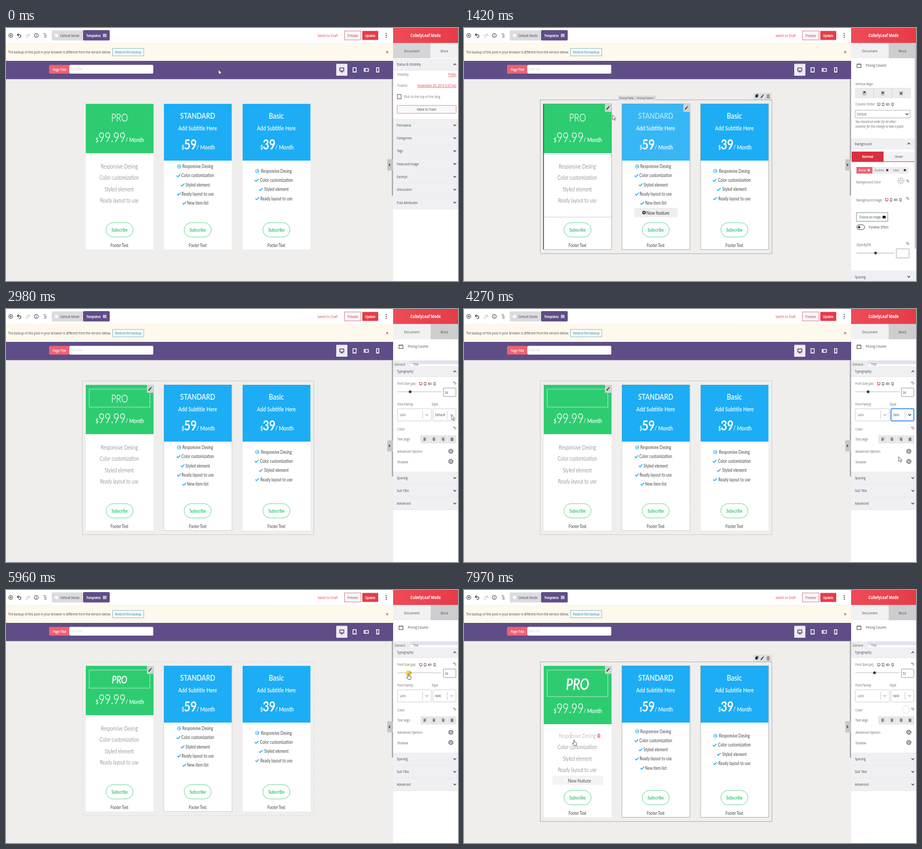
Write an HTML page that moves like this. It is 850 px wide and 477 px high and loops after 8000 ms.

```html
<!DOCTYPE html>
<html lang="en">
<head>
<meta charset="utf-8">
<title>Pricing table editor</title>
<style>
html, body { margin: 0; width: 100%; height: 100%; overflow: hidden; background: #efeeec; }
svg { display: block; width: 100%; height: 100%; font-family: "Open Sans", "Noto Sans", sans-serif; }
.l { font-family: Lato, sans-serif; }
</style>
</head>
<body>
<svg id="stage" viewBox="0 0 850 477"></svg>
<script>
const LOOP = 8000, INK = '#454952', RED = '#e63c48', BLUE = '#1cadf5', GREEN = '#2ecc71', PURPLE = '#5f4d87', PALE = '#f0f0f3';

// Drawing helpers; all lettering shares one narrow set.
const text = (x, y, size, str, o = '') => `<text transform="translate(${x} ${y}) scale(.79 1)" font-size="${size}" ${o.includes('fill=') ? '' : `fill="${INK}"`} ${o}>${str}</text>`;
const mid = (x, y, size, str, o = '') => text(x, y, size, str, 'text-anchor="middle" ' + o);
const lato = (x, y, size, str, o = '') => mid(x, y, size, str, 'class="l" ' + o);
const rect = (x, y, w, h, fill, o = '') => `<rect x="${x}" y="${y}" width="${w}" height="${h}" fill="${fill}" ${o}/>`;
const line = (d, color = INK, w = 1, o = '') => `<path d="${d}" fill="none" stroke="${color}" stroke-width="${w}" ${o}/>`;
const dot = (x, y, r, fill, o = '') => `<circle cx="${x}" cy="${y}" r="${r}" fill="${fill}" ${o}/>`;
const at = (x, y, s, body) => `<g transform="translate(${x} ${y}) scale(${s})">${body}</g>`;
const group = (id, body) => `<g id="${id}">${body}</g>`;
const border = (c, w = 1) => `stroke="${c}" stroke-width="${w}"`;
const dash = (x, y, w, h, id) => rect(x, y, w, h, 'none', `id="${id}" ${border('#777', .8)} stroke-dasharray="2 1"`);

const chevron = (x, y, up, c = '#333') => line(`M${x - 2.5} ${y + (up ? 1.3 : -1.3)}l2.5 ${up ? -2.6 : 2.6}l2.5 ${up ? 2.6 : -2.6}`, c, 1.2);
const undo = (x, y, s, c = '#555') => at(x, y, s, line('M-3 -1H1A2.4 2.4 0 0 1 1 3.6H-1M-1 -3.4L-3.5 -1L-1 1.4', c, 1.1));
const pencil = (x, y) => line(`M${x - 2.3} ${y + 2.6}l4 -4.6`, '#333', 1.8) + line(`M${x - 3} ${y + 3.4}l1 -1M${x + 2} ${y - 2.4}l.8 -.9`, '#333', 1.2);
const trash = (x, y, c) => line(`M${x - 2.5} ${y - 2.2}h5M${x - 1} ${y - 3.2}h2M${x - 2} ${y - 1.5}v5h4v-5M${x} ${y - 1}v4`, c, .9);
const check = (x, y) => line(`M${x - 3} ${y}l2.2 2.2l4.4 -4.6`, BLUE, 1.6);
const gear = (x, y) => dot(x, y, 3.3, 'none', border('#444', .9)) + dot(x, y, 1.4, 'none', border('#444', .8)) +
  dot(x, y, 4.1, 'none', border('#444', 1.2) + ' stroke-dasharray="1.6 1.62"');

function device(x, y, kind, s, c) {
  const b = border(c, 1.4);
  return at(x, y, s, [
    rect(-4.2, -4, 8.4, 6.2, 'none', b) + line('M0 2V4.5M-2.5 4.5H2.5', c, 1.2),
    rect(-3, -4.2, 6, 8.4, 'none', b) + line('M-1 3H1', c, 1.2),
    rect(-4, -2.6, 8, 5.2, 'none', b) + line('M-2.2 -2V2', c, 1.4),
    rect(-2.2, -4.2, 4.4, 8.4, 'none', b) + line('M-1 3H1', c, 1.2)
  ][kind]);
}
const devices = (xs, y) => xs.map((x, i) => device(x, y, i, .58, i ? '#555' : '#c33')).join('');
const section = (y, h, label, up, cx = 844) => rect(728, y, 122, h, PALE) + line(`M728 ${y + h}H850`, '#e2e2e6', .8) +
  text(735, y + h / 2 + 2.6, 7.2, label, 'font-weight="500"') + chevron(cx, y + h / 2, up);
const aligns = (x, y, n) => line([-2.4, -.8, .8, 2.4].map((d, i) => {
  const w = i % 2 && n < 3 ? 3 : 5, start = [-2.5, -w / 2, 2.5 - w, -2.5][n];
  return `M${x + start} ${y + d}h${w}`;
}).join(''), '#333', .9);

function topBar() {
  return rect(0, 0, 728, 28.5, '#fff') +
    dot(9, 14, 3.8, 'none', border('#444')) + line('M7 14h4M9 12v4', '#444') +
    undo(25, 14, 1.1, '#444') + at(41, 14, 1.1, '<g transform="scale(-1 1)">' + undo(0, 0, 1, '#ccc') + '</g>') +
    dot(57, 14, 3.8, 'none', border('#444')) + line('M57 13.4v2.8M57 11.6v1', '#444') +
    line('M70.5 11h4.5M72 14h4.5M72 17h4.5', '#444', 1.1) +
    rect(86, 4.5, 62, 19, '#dcdcdf', 'rx="2"') + dot(95, 14, 3, '#fff') + text(102, 16.8, 7.2, 'Default Mode') +
    rect(145, 4, 50, 19.5, PURPLE, 'rx="2"') + text(151, 16.7, 6.7, 'Templates', 'fill="#fff" font-weight="700"') +
    [0, 1, 2].map(i => [0, 1, 2].map(j => rect(182.5 + i * 2.2, 11 + j * 2.2, 1.7, 1.7, '#fff')).join('')).join('') +
    text(586, 16.8, 7, 'Switch to Draft', `fill="${RED}"`) +
    rect(636.5, 5.5, 31, 17, '#f6f5f8', border('#d98790')) + mid(652, 16.8, 6.8, 'Preview', 'fill="#c03a4e"') +
    rect(670, 5.5, 30, 17, RED, 'rx="1"') + mid(685, 16.7, 6.7, 'Update', 'fill="#fff" font-weight="700"') +
    [10.5, 14, 17.5].map(y => dot(715, y, 1, '#333')).join('') +
    rect(0, 28.5, 728, 33.5, '#fef8ed') +
    text(4, 48.2, 7, 'The backup of this post in your browser is different from the version below.') +
    rect(200.5, 38.5, 58.5, 14, '#f7fafa', border('#8fc0cb')) + text(205, 48, 7, 'Restore the backup', 'fill="#23869c"') +
    line('M715 43.5l3.5 4M718.5 43.5l-3.5 4', '#444', 1) +
    rect(0, 62, 728, 34.4, PURPLE) +
    rect(119, 69.5, 158, 16.5, '#fff', 'rx="2"') + rect(81, 69.5, 38, 16.5, '#ee6173', 'rx="2"') +
    text(88, 80.5, 6.9, 'Page Title', 'fill="#fff" font-weight="600"') + text(123, 79.5, 6.6, 'Add title', 'fill="#d5d5da"') +
    rect(621, 67.5, 21, 22.5, '#eeeaf5', 'rx="1"') + [631.5, 655.5, 677.5, 699].map((x, i) => device(x, 79, i, i ? 1 : .9, i ? '#fff' : '#3d3457')).join('');
}

function card(n, x, fill, title, price, names, starts, y) {
  const c = x + 63.5, pro = n === 1;
  const white = 'fill="#fff" ';
  const rows = names.map((s, i) => pro
    ? lato(c - .5, y + i * 21.6 + 4, 10.9, s, `fill="#555" font-weight="300" ${i ? '' : 'id="first"'}`)
    : (i ? check(starts[i] - 6, y + i * 17.3) :
        dot(starts[0] - 6.5, y, 3.3, 'none', border(BLUE)) + line(`M${starts[0] - 8.5} ${y}h4m-1.7 -1.6l1.7 1.6l-1.7 1.6`, BLUE, .9)) +
      lato(c, y + i * 17.3 + 3, 8.9, s, 'fill="#444"')).join('');
  const head = pro
    ? group('fee', text(168.5, 215, 12, '$', white + 'class="l" font-weight="600"') +
        text(174, 215, 25.3, '99.99', white + `class="l" font-weight="300" ${border('#fff', .3)}`) +
        text(225, 215, 11.9, '/ Month', white + 'class="l" font-weight="600"'))
    : lato(c, 171, 15.6, title, white + `font-weight="600" id="title${n}"`) +
      lato(c, 192.7, 11.7, 'Add Subtitle Here', white + 'font-weight="600"') +
      text(c - 30.5, 229, 11.9, '$', white + 'class="l" font-weight="600"') +
      text(c - 25.8, 229, 26.5, price, white + 'class="l" font-weight="700"') +
      text(c - 2, 229, 11.9, '/ Month', white + 'class="l" font-weight="600"');
  return rect(x, 143, 127.5, 274.5, '#fff', `id="body${n}"`) +
    rect(x, 143, 127.5, pro ? 93 : 107, fill, `id="head${n}"`) + head + group('list' + n, rows) +
    group('foot' + n, rect(c - 25.5, 367, 51, 27, '#fff', `rx="13.5" ${border('#63d694')}`) +
      lato(c, 384, 9, 'Subscribe', `fill="${GREEN}" font-weight="700"`) + lato(c, 413.3, 8.6, 'Footer Text', 'fill="#444"'));
}

function canvas() {
  const items = ['Responsive Desing', 'Color customization', 'Styled element', 'Ready layout to use', 'New item list'];
  return card(1, 150, GREEN, '', '', items.slice(0, 4), [], 260.5) +
    card(2, 297, BLUE, 'STANDARD', '59', items, [332, 330, 338, 331, 341], 261) +
    card(3, 445, BLUE, 'Basic', '39', items.slice(0, 4), [479, 477, 485, 478], 269.6) +
    lato(213.5, 0, 20, 'PRO', `fill="#fff" id="pro" ${border('#fff', .3)}`) +
    rect(156.5, 151, 114, 34, 'none', `id="box" ${border('#b5e8ca')}`) +
    group('add1', rect(166.5, 336, 95, 17.5, '#eee', 'id="addBg"') + dot(190.5, 345, 2.7, '#fafafa') + lato(217, 348.5, 10.1, 'New feature', 'fill="#555"')) +
    group('add2', rect(320, 339, 82, 17.5, '#eee') + dot(338.5, 348, 3.2, '#222') + line('M336.7 348h3.6M338.5 346.2v3.6', '#fff', .9) + lato(364.5, 351.5, 10.1, 'New feature', 'fill="#333"')) +
    dash(143.5, 135.5, 435.5, 290, 'frame') + dash(149.5, 143, 128, 274.5, 'edge1') + dash(297, 143, 128, 274.5, 'edge2') + dash(445, 143, 128, 274.5, 'edge3') +
    group('pick', line('M149.5 143V417.5', '#333', 1.3)) +
    group('rules', line('M150 238.5H277M150 356.5H277', '#d0cce4', 1)) +
    group('tools', rect(544, 122, 35, 13, '#dedfe0') + rect(548, 126, 4, 5, '#222') + line('M549.5 125h3.5v4.5', '#222', 1) + pencil(561, 128.5) + trash(572, 128.5, '#555')) +
    group('pen1', rect(265, 143, 12.5, 15, '#cfd3d2') + pencil(271, 150.5)) +
    group('pen2', rect(412.5, 143, 12.5, 15, '#cfd3d2') + pencil(418.5, 150.5)) +
    group('crumb', rect(290, 127.5, 71.5, 8.5, '#dcdcdd') + text(292, 134, 5.7, 'Pricing Table → Pricing Column')) +
    group('caret', line('M0 0V22', '#fff', .8)) +
    group('bin', trash(253.5, 274.5, RED) + line('M201.5 268v13', '#aaa', .7)) +
    rect(725.5, 97, 2.5, 219, '#aaaaac') +
    rect(717, 247.5, 11, 21, '#c6c6c9') + line('M720 256l2 2l-2 2', '#222', 1.1);
}

function docPanel() {
  return section(58, 21.5, 'Status &amp; Visibility', true) +
    text(736, 90.3, 7, 'Visibility', 'fill="#777"') + text(847, 90.3, 7, 'Public', `text-anchor="end" text-decoration="underline" fill="${RED}"`) +
    text(736, 110.6, 7, 'Publish', 'fill="#777"') + text(847, 110.6, 7.1, 'November 29, 2019 9:37 pm', `text-anchor="end" text-decoration="underline" fill="${RED}"`) +
    rect(736, 125.5, 7, 8, '#fff', border('#555')) + text(748, 132.2, 7.1, 'Stick to the top of the blog', 'fill="#777"') +
    rect(735.5, 146, 111, 15, '#f9f8f9', `rx="1" ${border('#dd8b94')}`) + mid(791, 156.3, 7, 'Move to Trash') +
    ['Permalink', 'Categories', 'Tags', 'Featured Image', 'Excerpt', 'Discussion', 'Post Attributes']
      .map((s, i) => section(171 + i * 24.3, 24.3, s)).join('');
}

function columnPanel() {
  const grey = 'fill="#666"';
  const mini = (x, w, s, on) => rect(x, 262, w, 12.5, on ? '#ee6173' : '#ececee') + text(x + 4, 270.4, 5.6, s, on ? 'fill="#fff" font-weight="600"' : grey) +
    rect(x + w - 9, 266, 4, 4, on ? '#fff' : '#444');
  return text(736, 107.8, 7, 'Vertical Align', grey) + rect(736, 113.5, 104, 18, '#ececee', border('#ddd', .8)) + line('M770.5 114v17M805 114v17', '#d6d6d8') +
    [753, 787.5, 822].map((x, i) => line(`M${x - 3} ${126}h6M${x - 2.5} 119v6M${x + 2.5} 119v6`, '#777', .9) + rect(x - 1.2, 119 + i, 2.4, 4, '#333')).join('') +
    text(736, 146.3, 7, 'Column Order', grey) + devices([780, 788, 797, 806], 144) +
    rect(736, 155, 103, 14.5, '#fff', border('#aaa', .9)) + text(739, 165, 6.8, 'Default', grey) + chevron(833, 162.3) +
    text(736, 178.5, 6.7, 'You should set order for all other', grey + ' font-style="italic"') + text(736, 188.3, 6.7, 'columns for this change to take a place', grey + ' font-style="italic"') +
    section(208, 20, 'Background', true, 836.5) +
    rect(729, 233, 60, 19, '#d9303f') + mid(759, 245, 7, 'Normal', 'fill="#fff" font-weight="700"') + rect(789, 233, 58, 19, '#f3f3f5') + mid(818, 245, 7, 'Hover') +
    line('M729 252H847', '#d9303f', 1) +
    mini(738, 30, 'Classic', true) + mini(768, 35, 'Gradient') + mini(803, 33, 'Video') +
    text(738, 293.4, 7, 'Background Color', grey) + dot(821.5, 288, 5.5, '#eee', `${border('#bbb', 1.5)} stroke-dasharray="2 2"`) + line('M821.5 281v14M814.5 288h14', '#bbb', .8, 'stroke-dasharray="2 1"') + undo(834.5, 288, .75) +
    text(738, 326.5, 7, 'Background Image', grey) + devices([795, 803, 812, 821], 324) + undo(834.5, 321, .75) +
    rect(738, 348, 59, 16.5, '#fff', border('#7d9298')) + text(743, 358.8, 6.4, 'Choose an image') + rect(787, 354, 6, 5, '#222') +
    rect(738.5, 371, 15, 9, '#fff', `rx="4.5" ${border('#444')}`) + dot(743, 375.5, 2.3, '#333') + text(761, 378.2, 7.2, 'Parallax Effect') +
    text(738, 411, 7, 'Opacity(%)', grey) + undo(834.5, 406, .75) + line('M738 424.3H809', '#bbb', 1.2) + dot(774, 424.3, 2.5, '#333') +
    rect(813, 416.5, 24, 17, '#fff', border('#aaa')) + section(457, 24, 'Spacing', false, 836.5) + rect(847.5, 33, 2.5, 383, '#c3c3c6');
}

function typePanel() {
  const grey = 'fill="#666"';
  const select = (x, w) => rect(x, 188, w, 23, '#fff', `rx="1.5" ${border('#ccc')}`);
  return rect(728, 97, 32, 11, '#ececee') + rect(760, 97, 90, 7, '#e4dff1') + text(731, 107.3, 6.5, 'Element', grey) + text(765.5, 107.3, 6.5, 'Title', grey) +
    section(108, 19.5, 'Typography', true) +
    text(736, 143, 7, 'Font Size (px)', grey) + devices([780, 788, 797, 806], 141) + undo(844, 139, .75) +
    line('M736 156H819', '#bbb', 1.2) + dot(760, 156, 2.6, '#333', 'id="knob"') + rect(822.5, 149, 23.5, 16, '#fff', `rx="1" ${border('#999')}`) + text(825, 160, 7, '34', 'id="size"') +
    text(736, 182, 7, 'Font Family', grey) + text(800.5, 182, 7, 'Style', grey) +
    select(736, 64) + text(740.5, 202.3, 7, 'Lato', grey) + line('M783.5 192v15', '#ccc') + chevron(791.5, 199.5, false, '#aaa') +
    select(803, 43) + text(807, 202.3, 7, 'Default', 'id="style"') + line('M829.5 192v15', '#ccc') + chevron(838, 199.5, false, '#aaa') +
    group('focus', rect(803, 188, 43, 23, 'none', `rx="2" ${border('#2684ff', 1.6)}`) + chevron(838, 199.5)) +
    text(736, 228.7, 7, 'Color', grey) + undo(844, 224, .75) + dot(831, 225.5, 7, '#fff', `id="swatch" ${border('#ddd')}`) +
    text(736, 248, 7, 'Text align', grey) + [0, 1, 2, 3].map(i => rect(779.5 + i * 17, 238, 16.4, 15.5, '#e6e6e9') + aligns(787.7 + i * 17, 245.7, i)).join('') +
    text(736, 271, 7, 'Advanced Options', grey) + gear(836.5, 268.3) + text(736, 290.5, 7, 'Shadow', grey) + gear(836.5, 287.5) +
    section(306.5, 24, 'Spacing') + section(330.5, 24, 'Sub Title') + section(354.5, 24, 'Advanced') +
    group('menu', rect(803, 214, 43.5, 112, '#fff', `rx="2" ${border('#ccc')}`) + rect(803.5, 0, 42.5, 27, '#deebff', 'id="hot"') +
      ['Default', 'normal', 'italic', 'oblique'].map((s, i) => text(808, 230.5 + i * 27.5, 7, s)).join(''));
}

const stage = document.getElementById('stage');
stage.innerHTML = '<linearGradient id="blush"><stop stop-color="#ee4c58"/><stop offset="1" stop-color="#e63b47"/></linearGradient>' +
  rect(0, 0, 850, 477, '#efeeec') + topBar() + canvas() + rect(728, 0, 122, 477, '#fff') + rect(728, 0, 122, 28.5, 'url(#blush)') +
  mid(789, 16.9, 8.4, 'CubelyLeaf Mode', 'fill="#fff" font-weight="700"') +
  rect(728, 28.5, 70.5, 28.5, '#f1f1f3', 'id="tab1"') + rect(798.5, 28.5, 51.5, 28.5, '#f1f1f3', 'id="tab2"') +
  mid(763, 45.5, 7.6, 'Document', 'fill="#555"') + mid(824.5, 45.5, 7.4, 'Block', 'fill="#555"') +
  group('docPanel', docPanel()) +
  group('blockTop', rect(739, 68.5, 7.5, 6, 'none', border('#444')) + line('M740.8 68v-1.7M744.6 68v-1.7', '#444', 1) + text(755.5, 72.6, 7, 'Pricing Column')) +
  group('columnPanel', columnPanel()) + group('waitPanel', section(354.5, 24, 'Advanced')) + group('typePanel', typePanel()) +
  dot(0, 0, 5.5, '#fbcf2f', 'id="glow" fill-opacity=".85"') +
  group('arrow', `<path d="M0 0V9L2.1 7.1L3.6 10.2L4.9 9.6L3.5 6.6H6.3Z" fill="#fff" ${border('#333', .7)}/>`) +
  group('hand', `<path d="M-1 1Q0 -.6 1 1V4.2L4 5.1Q5.2 5.6 4.8 7.2L4 10.5H-.8L-3.6 6.8Q-3.2 5.4 -1 7Z" fill="#fff" ${border('#333', .8)} stroke-linejoin="round"/>`);

const el = {};
stage.querySelectorAll('[id]').forEach(n => el[n.id] = n);
const set = (id, name, value) => el[id].setAttribute(name, value);
const show = (id, on) => set(id, 'opacity', Number(on));
const move = (id, x, y) => set(id, 'transform', `translate(${x} ${y})`);
const clamp = v => Math.max(0, Math.min(1, v));
const smooth = v => (v = clamp(v)) * v * (3 - 2 * v);
const within = (t, a, b = Infinity) => t >= a && t < b;
const fade = (t, a, b = Infinity) => clamp((t - a) / 100) * clamp((b - t) / 100);

// Pointer stops: time, x, y
const route = [[90, 399.5, 78.5], [430, 214.5, 172], [910, 214.5, 172], [1180, 765, 195], [1420, 279.5, 164], [1690, 216, 172],
  [2330, 216, 172], [2950, 838, 200], [3300, 838, 200], [3820, 817.5, 278.5], [4620, 817.5, 278.5], [5080, 300, 235], [5400, 330, 240],
  [5880, 757, 158], [6390, 757, 158], [7080, 770, 158], [7230, 770, 158], [7620, 207, 282.5]];

function pointer(t) {
  const i = route.findIndex(k => k[0] > t);
  if (i === 0) return route[0].slice(1);
  if (i < 0) return route[route.length - 1].slice(1);
  const [a, b] = [route[i - 1], route[i]], k = smooth((t - a[0]) / (b[0] - a[0]));
  return [a[1] + (b[1] - a[1]) * k, a[2] + (b[2] - a[2]) * k];
}

function render(t) {
  const grow = smooth((t - 6400) / 660), size = Math.round(34 + 18 * grow), p = (size - 34) / 18;
  const early = within(t, 380, 2500), active = early || within(t, 4850, 5500) || t >= 7400;
  const hover1 = within(t, 400, 960) || within(t, 1740, 2400), hover2 = within(t, 990, 1600);

  // Cards
  [1, 2, 3].forEach(n => {
    set('body' + n, 'height', 274.5 + 11 * p);
    set('edge' + n, 'height', 274.5 + 11 * p);
    move('list' + n, 0, (n === 1 ? 14 : 5.5) * p);
    move('foot' + n, 0, 11 * p);
  });
  set('head1', 'height', 93 + 17 * p);
  set('head1', 'fill', hover1 ? '#46d17f' : GREEN);
  set('head2', 'fill', hover2 ? '#37b6f6' : BLUE);
  move('fee', 0, 17 * p);
  show('title2', hover2 ? .65 : 1);
  const styled = t >= 4080;
  set('pro', 'transform', `translate(213.5 ${175.7 + 12.3 * p}) scale(.79 1)`);
  set('pro', 'font-size', styled ? 19.5 + 9.7 * p : 20.3);
  set('pro', 'font-weight', styled ? 400 : 300);
  set('pro', 'stroke-width', styled ? .5 + .2 * p : .3);
  set('pro', 'font-style', styled ? 'italic' : 'normal');
  show('pro', within(t, 4080, 4640) ? 0 : hover1 ? .75 : 1);
  set('box', 'height', 34 + 16 * p);
  show('box', t >= 1760);

  // Editing marks
  show('add1', Math.max(fade(t, 430, 960), fade(t, 1740, 2420), fade(t, 7470)));
  move('add1', 0, 14 * p);
  set('addBg', 'fill', p ? '#f3f3f3' : '#eee');
  show('add2', fade(t, 990, 1620));
  set('frame', 'height', 290 + 11 * p);
  set('frame', 'stroke', active ? '#777' : '#c6c6c6');
  set('frame', 'stroke-dasharray', active ? '2 1' : t < 5500 ? 'none' : '2 4');
  show('frame', t >= 380);
  show('edge1', early);
  show('edge2', t < 380 ? 0 : active ? 1 : .5);
  show('edge3', within(t, 990, 2500) || t >= 7400);
  show('pick', early);
  show('rules', within(t, 400, 1740));
  show('tools', active);
  show('pen1', t >= 380);
  show('pen2', within(t, 990, 1700));
  show('crumb', within(t, 990, 1600));
  show('caret', within(t, 520, 910) || within(t, 1800, 2330));
  move('caret', t < 1000 ? 207.5 : 216.5, 157);
  show('first', t >= 7560 ? .6 : 1);
  show('bin', t >= 7560);

  // Sidebar
  const panel = t < 480 ? 'docPanel' : t < 2290 ? 'columnPanel' : t < 2420 ? 'waitPanel' : 'typePanel';
  ['docPanel', 'columnPanel', 'waitPanel', 'typePanel'].forEach(id => set(id, 'display', id === panel ? 'inline' : 'none'));
  const doc = t < 480;
  show('blockTop', !doc);
  set('tab1', 'fill', doc ? '#d5d5d7' : '#f1f1f3');
  set('tab2', 'fill', doc ? '#f1f1f3' : '#cdcdcf');
  set('knob', 'cx', 760 + 12 * p);
  el.size.textContent = size;
  el.style.textContent = styled ? 'italic' : 'Default';
  show('focus', within(t, 3110, 5000));
  show('swatch', t >= 6370);
  show('menu', fade(t, 3130, 4130));

  // Pointer
  const [x, y] = pointer(t);
  const hand = within(t, 420, 960) || within(t, 1650, 2400) || within(t, 5850, 7240) || t >= 7860;
  set('hot', 'y', 214.5 + 27.5 * Math.max(0, Math.min(3, Math.floor((y - 214) / 27.5))));
  move('arrow', x, y);
  move('hand', x, y);
  show('arrow', !hand);
  show('hand', hand);
  move('glow', x, y - 1);
  show('glow', fade(t, 5840, 7120));
}

function tick(now) {
  render(now % LOOP);
  requestAnimationFrame(tick);
}
render(0);
requestAnimationFrame(tick);
</script>
</body>
</html>
```
